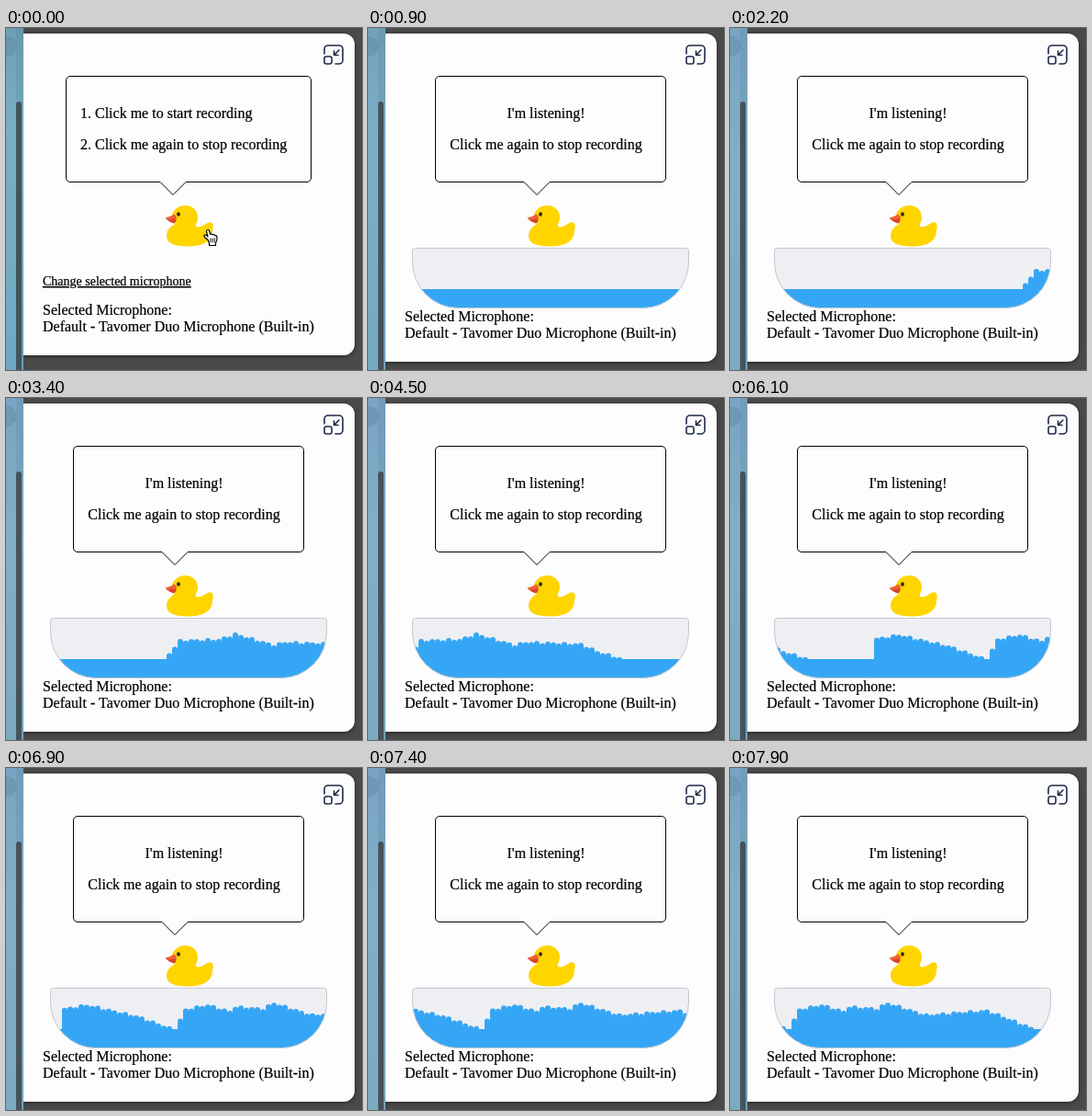
An HTML page for the animation above (8000 ms loop, 388x372 px).

```html
<!DOCTYPE html>
<html lang="en">
<head>
<meta charset="utf-8">
<title>Duck recorder</title>
<style>
  html, body { margin: 0; width: 100%; height: 100%; overflow: hidden; background: #4a4a4a; }
  svg { display: block; }
  text { font: 16px "Liberation Serif", "Times New Roman", serif; fill: #000; stroke: #000; stroke-width: .22; white-space: pre; }
  .small { font-size: 14px; text-decoration: underline; }
  .mid { text-anchor: middle; }
  .bubble { fill: #fdfdfd; stroke: #000; }
  #panel { filter: drop-shadow(0 1px 2px #0008); }
</style>
</head>
<body>
<svg width="388" height="372" viewBox="0 0 388 372">
  <defs>
    <linearGradient id="teal" x2="0" y2="1">
      <stop offset="0" stop-color="#6b9fb3"/>
      <stop offset=".3" stop-color="#78b0c4"/>
      <stop offset="1" stop-color="#6ba8c4"/>
    </linearGradient>
    <linearGradient id="blue" x2="0" y2="1">
      <stop offset="0" stop-color="#78a3c2"/>
      <stop offset=".4" stop-color="#80afc9"/>
      <stop offset="1" stop-color="#79abc0"/>
    </linearGradient>
    <filter id="grain" x="0" y="0" width="1" height="1">
      <feTurbulence type="fractalNoise" baseFrequency=".55" numOctaves="2" seed="4"/>
      <feColorMatrix values="0 0 0 0 .25  0 0 0 0 .4  0 0 0 0 .52  1.6 0 0 0 -.6"/>
    </filter>
    <path id="tub" d="M48.5 242.5a3 3 0 0 1 3-3H346.5a3 3 0 0 1 3 3V254.5a50 50 0 0 1-50 50H98.5a50 50 0 0 1-50-50Z"/>
    <clipPath id="inside"><use href="#tub"/></clipPath>
  </defs>

  <rect id="panel" y="6" width="380" rx="12" fill="#fdfdfd"/>

  <!-- strip with scrollbar over the panel's left side -->
  <rect width="19" height="372" fill="url(#teal)"/>
  <rect id="tint" width="19" height="372" fill="url(#blue)"/>
  <circle cx="1" cy="20" r="11" fill="#4f7f98" opacity=".35"/>
  <rect width="19" height="372" filter="url(#grain)" opacity=".5"/>
  <rect x="11" width="8" height="372" fill="#456f88" opacity=".15"/>
  <rect x="11" y="80" width="6" height="300" rx="3" fill="#46525c"/>

  <g fill="none" stroke="#1f2a48" stroke-width="1.6" stroke-linecap="round" stroke-linejoin="round">
    <path d="M347 28V23a4 4 0 0 1 4-4H363a4 4 0 0 1 4 4V35a4 4 0 0 1-4 4H359"/>
    <rect x="347" y="31" width="8" height="8" rx="2"/>
    <path d="M363 24L357.5 29.5M357.5 25V29.5H362"/>
  </g>

  <g id="idle">
    <path class="bubble" data-box="65.5 332.5 182"/>
    <text x="81" y="98">1.</text><text x="97" y="98">Click me to start recording</text>
    <text x="81" y="132">2.</text><text x="97" y="132">Click me again to stop recording</text>
    <text class="small" x="40" y="280">Change selected microphone</text>
  </g>

  <g id="live">
    <path class="bubble" data-box="73.5 324.5 184"/>
    <text class="mid" x="194" y="98">I'm listening!</text>
    <text class="mid" x="194" y="132">Click me again to stop recording</text>
    <g clip-path="url(#inside)">
      <rect x="48" y="239" width="302" height="66" fill="#eeeff3"/>
      <rect x="48" y="284" width="302" height="21" fill="#35a6f5"/>
      <path id="wave" fill="none" stroke="#35a6f5" stroke-width="6" stroke-linecap="round"/>
    </g>
    <use href="#tub" fill="none" stroke="#c3c6cc"/>
  </g>

  <!-- duck -->
  <path fill="#ffd500" d="M195 193C204 193 209 199 209 206C209 211 206 213 207 216C212 218 217 213 221 211.500C225 210 227 215 225 220C225 232 215 237.500 198 237.500C183 237.500 175 234 175 226C175 219 180 216 184 213C180 209 180 203 183 199C186 195 190 193 195 193Z"/>
  <path fill="#f0602f" d="M183.500 202.500Q178 206 173.500 206.500Q175 209 180 209L186 207Q186 204 183.500 202.500Z"/>
  <path fill="#d8432b" d="M174.500 208Q179 209 185.500 207Q186 211 183 212.500Q178 211 174.500 208Z"/>
  <ellipse cx="188" cy="202.500" rx="1.900" ry="2.200" fill="#2e2a22"/>

  <g id="device">
    <text x="40" y="312">Selected Microphone:</text>
    <text x="40" y="330">Default - Tavomer Duo Microphone (Built-in)</text>
  </g>

  <g id="hand" stroke="#000" stroke-width="1.2" stroke-linejoin="round" stroke-linecap="round">
    <path fill="#fff" d="M220.500 231L216.500 227.500Q215 225.500 217 225Q218.500 225 220 227L218.500 221.500Q218.500 219.500 220 219.500Q221.300 219.500 221.700 221L222.800 224.500Q224.500 223.300 225.300 225Q227 224 227.800 225.800Q229.800 225.200 230 227.500Q230.300 231.500 228.500 234V236.500H221.500V234.500Z"/>
    <path fill="none" stroke-width=".9" d="M223 229V233M225.200 229V233M227.300 229V233"/>
  </g>
</svg>

<script>
const LOOP = 8000, STEP = 100, START = 400, CURSOR_OFF = 800;
const PITCH = 6, SCROLL = 12, CALM = 284;
const $ = id => document.getElementById(id);
const show = (id, on) => $(id).style.display = on ? '' : 'none';

// Loudness outline: bar index and top at each turning point.
const outline = [
  [96, CALM], [99, 263], [106, 262], [109, 256], [116, 268], [118, 265], [128, 267], [131, 275], [136, CALM],
  [147, CALM], [148, 261], [152, 257], [161, 269], [168, CALM],
  [170, 262], [174, 257], [178, 264], [179, 259], [184, 261], [186, 255], [193, 268], [204, 263], [213, CALM]
];

// Top of bar k: straight between turning points, with a small ripple while there is sound.
function barTop(k) {
  const i = outline.findIndex(([at]) => at >= k);
  if (i < 1) return CALM;
  const [k0, y0] = outline[i - 1], [k1, y1] = outline[i];
  const y = y0 + (y1 - y0) * (k - k0) / (k1 - k0);
  return y < CALM ? y + 1.2 * Math.sin(k * 2.4) : CALM;
}

function wavePath(shift) {
  let d = '';
  for (let k = Math.ceil((shift + 40) / PITCH); k * PITCH < shift + 350; k++)
    d += `M${k * PITCH + 4 - shift} ${barTop(k) + 3}V310`;
  return d;
}

document.querySelectorAll('.bubble').forEach(el => {
  const [l, r, c] = el.dataset.box.split(' ').map(Number), q = 4.5;
  const corner = (x, y) => `a${q} ${q} 0 0 1 ${x * q} ${y * q}`;
  el.setAttribute('d', `M${l + q} 52.5H${r - q}${corner(1, 1)}V${167.5 - q}${corner(-1, 1)}` +
    `H${c + 14}L${c} 181.5L${c - 14} 167.5H${l + q}${corner(-1, -1)}V${52.5 + q}${corner(1, -1)}Z`);
});

function draw() {
  const t = performance.now() % LOOP;
  const live = t >= START;

  show('idle', !live);
  show('live', live);
  show('hand', t < CURSOR_OFF);
  $('tint').setAttribute('opacity', Math.min(1, t / 2000));
  $('panel').setAttribute('height', live ? 357 : 350);
  $('device').setAttribute('transform', `translate(0 ${live ? 7 : 0})`);
  $('wave').setAttribute('d', wavePath(Math.floor(t / STEP) * SCROLL));
  requestAnimationFrame(draw);
}
draw();
</script>
</body>
</html>
```
